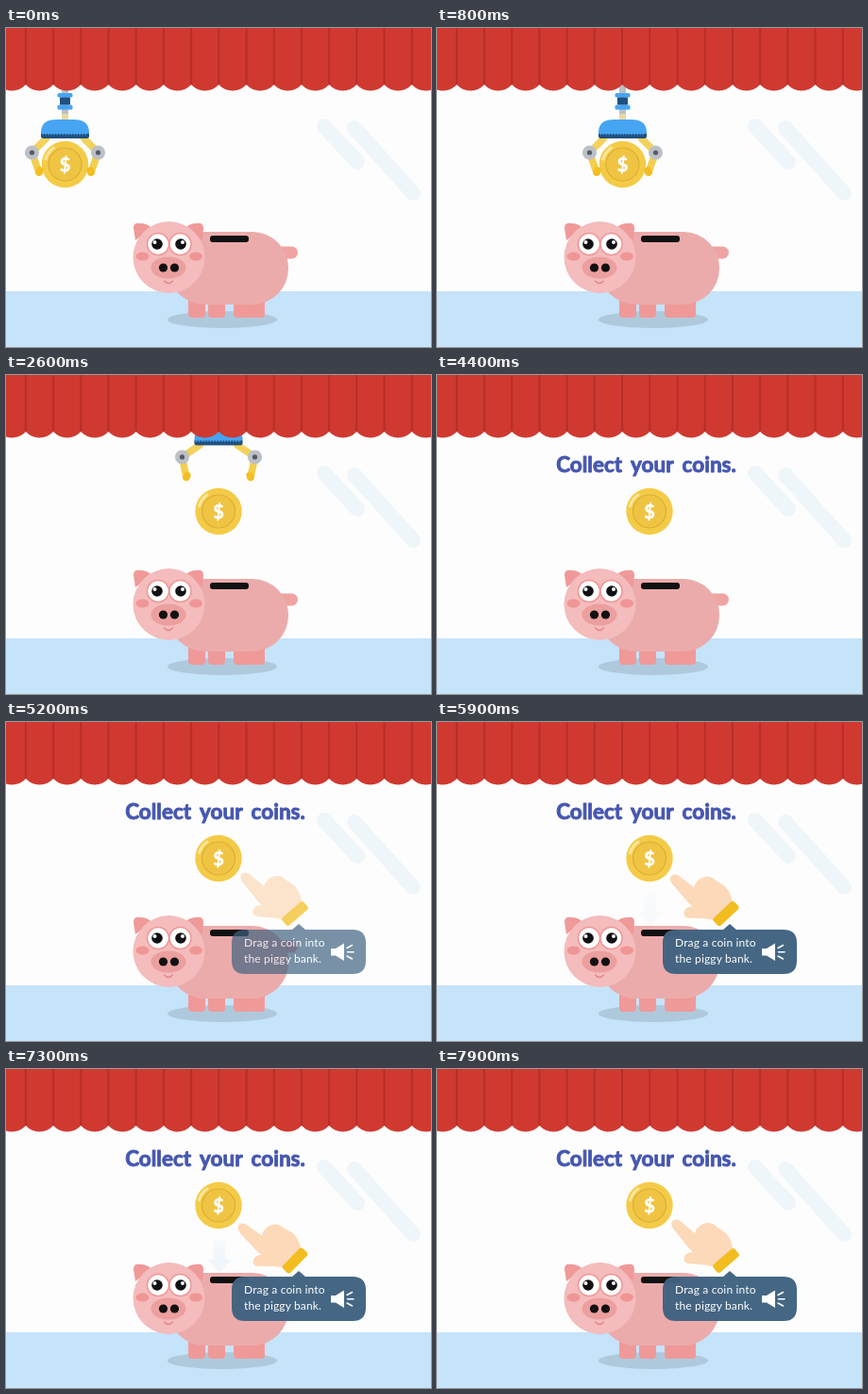
These frames come from a looping animation (450 by 338 pixels, 8000 ms). An HTML page:

```html
<!DOCTYPE html>
<html lang="en">
<head>
<meta charset="utf-8">
<title>Collect your coins</title>
<style>
html, body { margin: 0; width: 100%; height: 100%; overflow: hidden; background: #fdfdfd; }
svg { display: block; width: 100%; height: 100%; }
text { font-family: Lato, "Open Sans", sans-serif; }
</style>
</head>
<body>
<svg viewBox="0 0 450 338">
  <defs>
    <linearGradient id="fade" x2="0" y2="1">
      <stop offset="0" stop-color="#dcecf9" stop-opacity=".45"/>
      <stop offset=".6" stop-color="#d3e7f8"/>
    </linearGradient>
  </defs>
  <rect width="450" height="338" fill="#fdfdfd"/>
  <rect y="279" width="450" height="59" fill="#c5e3f9"/>
  <path d="M337 104L372 142M369 106L431 175" stroke="#eff6fa" stroke-width="16" stroke-linecap="round"/>

  <g id="pig">
    <ellipse cx="229" cy="309" rx="58" ry="9" fill="#afc9dc"/>
    <path d="M290 238H302.500" stroke="#f0a3a3" stroke-width="13" stroke-linecap="round"/>
    <g fill="#f09999">
      <rect x="193" y="280" width="18" height="27" rx="4"/>
      <rect x="214" y="280" width="18" height="27" rx="4"/>
      <rect x="241" y="280" width="18" height="27" rx="4"/>
      <rect x="256" y="280" width="18" height="27" rx="4"/>
    </g>
    <rect x="172" y="216" width="127" height="77" rx="38" fill="#ecabab"/>
    <rect x="216" y="220" width="41" height="7" rx="3" fill="#111"/>
    <path d="M137 225L135 212Q135 206 142 207Q150 207 154 212ZM208 225L209 212Q209 206 202 207Q194 207 190 212Z" fill="#f09999"/>
    <circle cx="172.500" cy="243" r="38" fill="#f4bcbc"/>
    <g fill="#f09595">
      <ellipse cx="144.500" cy="242" rx="7" ry="4.500"/>
      <ellipse cx="201" cy="242" rx="7" ry="4.500"/>
    </g>
    <g fill="#fff" stroke="#f09595" stroke-width="1.500">
      <circle cx="161" cy="229" r="11.500"/>
      <circle cx="184.500" cy="229" r="11.500"/>
    </g>
    <g fill="#111">
      <circle cx="160" cy="229" r="5.800"/>
      <circle cx="185" cy="229" r="5.800"/>
    </g>
    <g fill="#fff">
      <circle cx="157.500" cy="227" r="2"/>
      <circle cx="187" cy="227" r="2"/>
    </g>
    <ellipse cx="172" cy="254" rx="18.500" ry="11.500" fill="#ec9f9f"/>
    <g fill="#111">
      <circle cx="166.500" cy="254" r="4.600"/>
      <circle cx="178.500" cy="254" r="4.600"/>
    </g>
    <path d="M167.500 268Q172 273 176.500 268" fill="none" stroke="#e58585" stroke-width="1.300" stroke-linecap="round"/>
  </g>

  <path id="arrow" d="M219.500 180H232.500V202H239L226 216L213 202H219.500Z" fill="url(#fade)"/>

  <g id="coin">
    <circle cy="144.500" r="24.700" fill="#f4cb47"/>
    <circle cy="144.500" r="17.500" fill="#f0c443" stroke="#dcae34" stroke-width="1.200"/>
    <path d="M-20.500 139A21.200 21.200 0 0 1 -12 127" fill="none" stroke="#fae79a" stroke-width="3" stroke-linecap="round"/>
    <text y="151.500" text-anchor="middle" font-size="20" font-weight="900" fill="#fff">$</text>
  </g>

  <g id="claw">
    <rect x="-3.500" y="-60" width="7" height="158" fill="#b9c0c6"/>
    <rect x="-3.500" y="91" width="7" height="7" fill="#e9d9a0"/>
    <rect x="-8" y="69" width="16" height="4.500" rx="1.500" fill="#46a4f2"/>
    <rect x="-5.500" y="73.500" width="11" height="8" fill="#20507f"/>
    <rect x="-8" y="81.500" width="16" height="5" rx="1.500" fill="#46a4f2"/>
    <g id="arms"></g>
    <path d="M-25.500 113V110Q-25 97 -9 97H9Q25 97 25.500 110V113Z" fill="#46a4f2"/>
    <path d="M-25.500 112H25.500V115Q25.500 117 23 117H-23Q-25.500 117 -25.500 115Z" fill="#20507f"/>
    <path d="M-24 112.500H24" stroke="#46a4f2" stroke-width="1.500" stroke-dasharray="1.500"/>
  </g>

  <g id="curtain"></g>

  <text id="title" x="221.500" y="103" text-anchor="middle" font-size="22.500" font-weight="700" word-spacing="4"
    fill="#4657b0" stroke="#4657b0" stroke-width=".9" stroke-linejoin="round">Collect your coins.</text>

  <g id="hint">
    <g id="hand">
      <path d="M250 169Q246 162 251 160Q255 158 260 163L273 174Q276 164 287 163Q292 163 296 167L306 174Q312 181 313 190L294 210Q286 207 277 207L266 206Q260 205 262 199Q264 194 271 194Q266 190 262 184Z" fill="#fcd9b8"/>
      <rect x="291" y="197.500" width="30" height="11" rx="3" fill="#f2bd1f" transform="rotate(-41 306 203)"/>
    </g>
    <g fill="#3f6381" fill-opacity=".97">
      <path d="M239 234Q239 220 253 220H303L310 214L317 220H367Q381 220 381 234V253Q381 267 367 267H253Q239 267 239 253Z"/>
    </g>
    <g fill="#fff" font-size="12" letter-spacing=".15">
      <text x="252" y="238">Drag a coin into</text>
      <text x="252" y="255">the piggy bank.</text>
    </g>
    <path d="M344 240H349L358 234.500V253L349 247.500H344Z" fill="#fff"/>
    <path d="M361 239.500L366.500 236.500M361.500 243.700H368M361 248L366.500 251" stroke="#fff" stroke-width="1.500" stroke-linecap="round"/>
  </g>
</svg>
<script>
const LOOP = 8000;
const el = id => document.getElementById(id);
const set = (id, name, value) => el(id).setAttribute(name, value);
const ramp = (t, from, to) => Math.min(1, Math.max(0, (t - from) / (to - from)));
const ease = (t, from, to) => {
  const p = ramp(t, from, to);
  return p * p * (3 - 2 * p);
};

// Curtain panels with scalloped ends
let panels = '';
for (let i = 0; i < 16; i++) {
  const x = -8.3 + i * 29.2;
  panels += `<path d="M${x} 0H${x + 29.2}V60Q${x + 23} 66.500 ${x + 14.6} 66.500T${x} 60Z" fill="#cf3930"/>
    <path d="M${x} 0V60" stroke="#b62f29" stroke-width="2"/>`;
}
el('curtain').innerHTML = panels;

// One arm per side; open runs from 0 (gripping) to 1
function arm(side, open) {
  const px = side * (35 + 3.5 * open), py = 132 - 2.5 * open;
  const tx = side * (27.5 + 6.5 * open), ty = 153 - 2 * open;
  return `<g stroke-width="7.500" stroke-linecap="round">
    <path d="M${side * 20} 117L${px} ${py}" stroke="#f3d25c"/>
    <path d="M${px} ${py}L${tx} ${ty}" stroke="#f3cf4f"/>
    <path d="M${tx - side * 0.8} ${ty - 2}L${tx} ${ty}" stroke="#f4bd22"/></g>
    <circle cx="${px}" cy="${py}" r="7.500" fill="#bcc0c6"/>
    <circle cx="${px}" cy="${py}" r="2.600" fill="#555b66"/>`;
}

function draw(t) {
  const x = 62.5 + 162.5 * ease(t, 295, 985);
  const open = ease(t, 1150, 1600);
  const lift = 100 * ease(t, 2110, 3200);
  set('coin', 'transform', `translate(${x} 0)`);
  set('claw', 'transform', `translate(${x} ${-lift})`);
  el('arms').innerHTML = arm(-1, open) + arm(1, open);

  set('title', 'opacity', ramp(t, 3200, 3600));
  set('hint', 'opacity', ramp(t, 4700, 5400));

  const swing = ease(t, 5700, 6500) - ease(t, 6800, 7600);
  set('hand', 'transform', `rotate(${-14 * swing} 306 203)`);
  set('arrow', 'opacity', swing);
}

const start = performance.now();
function tick() {
  draw((performance.now() - start) % LOOP);
  requestAnimationFrame(tick);
}
tick();
</script>
</body>
</html>
```
